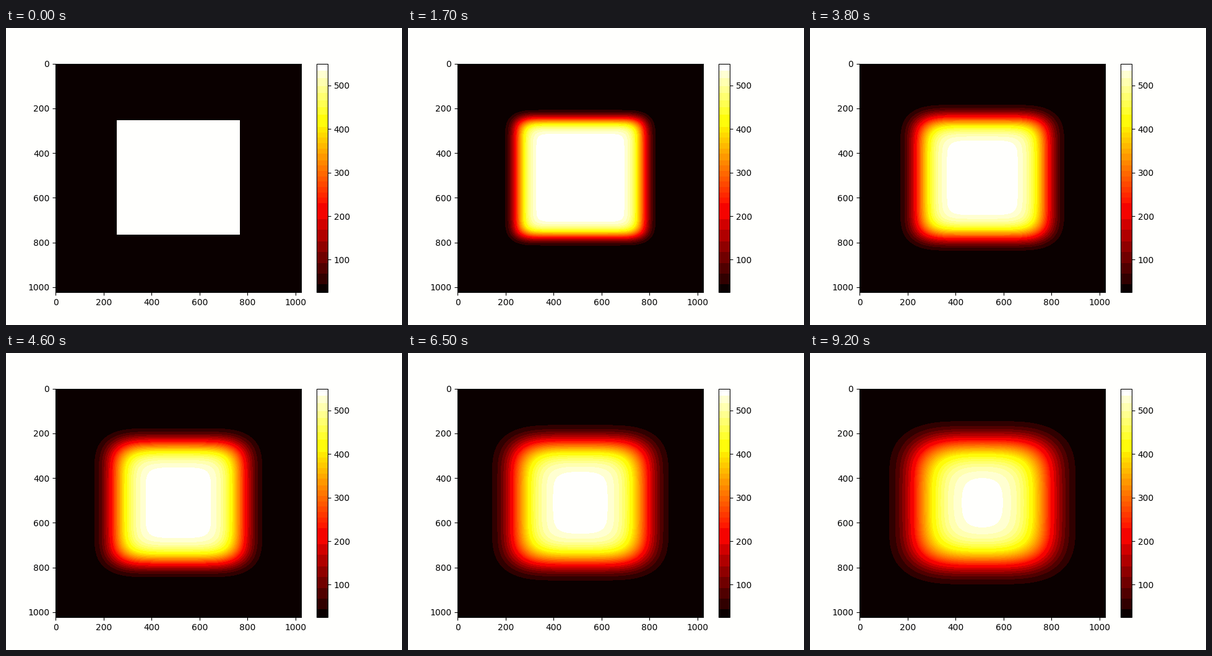
Recreate the animation shown at these times as a matplotlib script. Size 640 by 480 pixels, loop 9300 ms.

```python
import numpy as np
import matplotlib.pyplot as plt
from matplotlib.animation import FuncAnimation
from matplotlib.colors import ListedColormap

FRAMES = 93
COLD, HOT = 25, 550
SIZE = 1024            # side of the plate
CELL = 2               # side of one simulated cell
STEPS = 48             # time steps per frame
DIFF_X, DIFF_Y = 23.2, 15.6   # diffusivity of the cold plate per frame
GAIN = 1.2             # relative rise of diffusivity from cold to hot
PAPER = "#fffffd"


def banded_hot():
    """The hot colormap in flat bands: 8 reds, 16 greens, 8 blues."""
    rgba = plt.get_cmap("hot")(np.arange(256))
    levels = (rgba[:, :3] * 255).astype(int) // [32, 16, 32]
    edges = np.flatnonzero(np.any(np.diff(levels, axis=0), axis=1)) + 1
    bands = np.split(np.arange(256), edges)
    for band in bands:
        rgba[band] = rgba[band].mean(axis=0)
    rgba[bands[0], :3] = 10 / 255, 0, 0
    rgba[bands[-1], :3] = 1, 1, 253 / 255
    return ListedColormap(rgba)


def diffuse():
    """Heat spreading in one quadrant, with the plate's centre at [0, 0]."""
    n = SIZE // CELL // 2
    u = np.zeros((n, n), dtype=np.float32)
    u[:n // 2, :n // 2] = 1
    ax_, ay_ = (np.float32(d / CELL**2 / STEPS) for d in (DIFF_X, DIFF_Y))
    half_gain = np.float32(GAIN / 2)
    quadrants = [u.copy()]
    for _ in range(FRAMES - 1):
        for _ in range(STEPS):
            potential = u * (1 + half_gain * u)
            flow_x = ax_ * (potential[:, 1:] - potential[:, :-1])
            flow_y = ay_ * (potential[1:] - potential[:-1])
            u[:, :-1] += flow_x
            u[:, 1:] -= flow_x
            u[:-1] += flow_y
            u[1:] -= flow_y
        quadrants.append(u.copy())
    return quadrants


def plate(quadrant):
    """Mirror a quadrant into the whole plate, in degrees."""
    half = np.hstack([quadrant[:, ::-1], quadrant])
    return COLD + (HOT - COLD) * np.vstack([half[::-1], half])


quadrants = diffuse()

fig, ax = plt.subplots(figsize=(6.4, 4.8), dpi=100, facecolor=PAPER)
image = ax.imshow(
    plate(quadrants[0]), cmap=banded_hot(), vmin=COLD, vmax=HOT,
    extent=(-0.5, SIZE - 0.5, SIZE - 0.5, -0.5),
    aspect="auto", interpolation="nearest",
)
fig.colorbar(image, ax=ax)


def draw(i):
    # The starting square has hard edges; later fields are smooth.
    image.set_interpolation("bilinear" if i else "nearest")
    image.set_data(plate(quadrants[i]))
    return [image]


anim = FuncAnimation(fig, draw, frames=FRAMES, interval=100,
                     repeat=True, repeat_delay=0)
plt.show()
```
